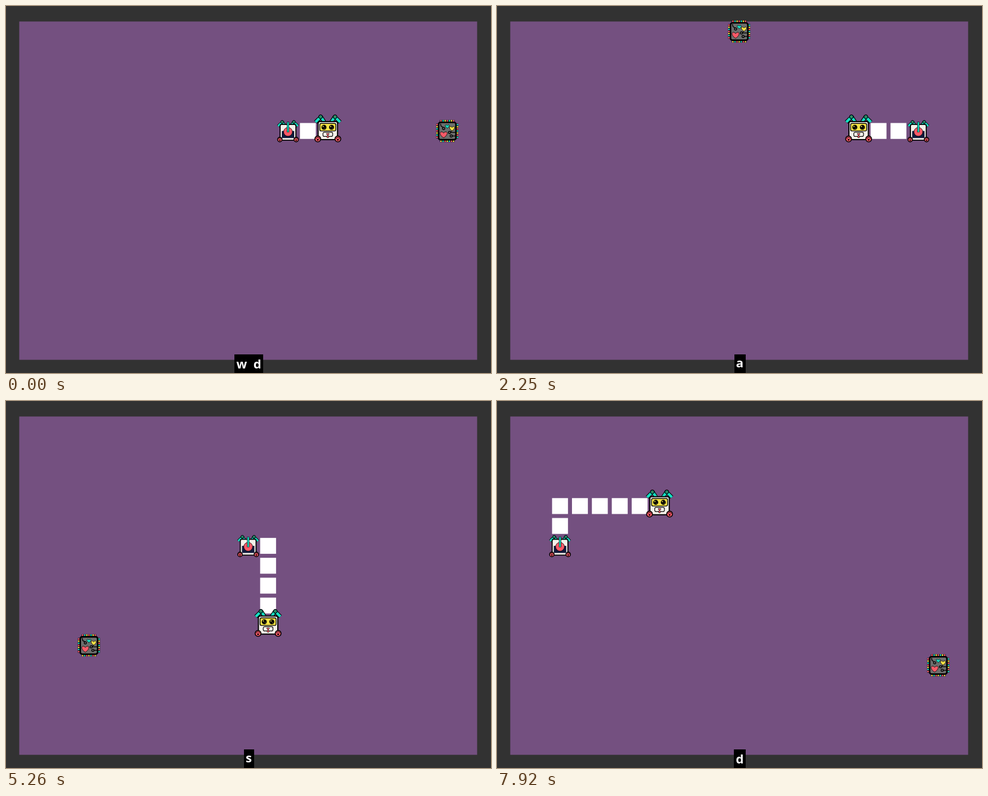
Animation, 860 px wide and 651 px high, one loop 8 s. Source, as an HTML page with a canvas:

```html
<!DOCTYPE html>
<html lang="en">
<head>
<meta charset="utf-8">
<title>Robot dog snake</title>
<style>
  html, body { margin: 0; width: 100%; height: 100%; overflow: hidden; background: #323232; }
  canvas { display: block; }
</style>
</head>
<body>
<canvas id="stage" width="860" height="651"></canvas>
<script>
const ctx = document.getElementById('stage').getContext('2d');
const LOOP = 8000, CELL = 35.3, LEFT = 23.5, TOP = 27.5;
const TEAL = '#14e0c4', RED = '#fb5a68', YELLOW = '#f3e145', WHITE = '#f4f1ea', NAVY = '#101a3c', BLACK = '#000';

// Route on the grid; the first two steps only lay out the starting body.
const ROUTE = 'R7 U4 R2 D4 L5 U5 L8 D6 R3 D5 L10 U7 R5';
const DIRS = { R: [1, 0], L: [-1, 0], U: [0, -1], D: [0, 1] };
const LEAD = 2;
const path = [[13, 5]];
for (const leg of ROUTE.split(' ')) {
  const [dx, dy] = DIRS[leg[0]];
  for (let i = +leg.slice(1); i > 0; i--) {
    const [x, y] = path[path.length - 1];
    path.push([x + dx, y + dy]);
  }
}

// [ms, move]; moves in between are evenly spaced.
const BEATS = [[-50, 0], [760, 7], [890, 8], [1090, 10], [1680, 15], [1780, 16], [2250, 20],
  [2510, 22], [2610, 23], [3210, 28], [3410, 30], [3540, 31], [4330, 38], [4460, 39], [5260, 46],
  [5390, 47], [6170, 54], [6270, 55], [6990, 61], [7090, 62], [7790, 68], [7920, 69]];

// [move at which the chip appears, column, row]
const CHIPS = [[0, 21, 5], [16, 11, 0], [31, 9, 6], [39, 3, 11], [56, 6, 4], [68, 21, 12]];

// [ms, keys held]
const KEYS = [[0, 'wd'], [30, 'd'], [620, 'dw'], [720, 'w'], [1120, 'wd'], [1300, 'wds'], [1390, 'ds'],
  [1810, 'dsa'], [1900, 'sa'], [2010, 'a'], [2350, 'wa'], [2440, 'w'], [2940, 'wa'], [3050, 'a'],
  [3850, 'as'], [3950, 's'], [4550, 'sd'], [4650, 'd'], [4890, 'ds'], [4990, 's'], [5480, 'sa'],
  [5590, 'a'], [6600, 'aw'], [6700, 'w'], [7410, 'wd'], [7510, 'd']];

// Last entry whose first value has been reached.
const latest = (list, v) => list.filter(e => e[0] <= v).pop();

function moveAt(t) {
  const from = latest(BEATS, t), to = BEATS[BEATS.indexOf(from) + 1];
  const [t0, m0] = from;
  if (!to) return m0;
  const [t1, m1] = to;
  return Math.floor(m0 + (m1 - m0) * (t - t0) / (t1 - t0) + 1e-6);
}

function rect(x, y, w, h, fill) {
  ctx.fillStyle = fill;
  ctx.fillRect(x, y, w, h);
}

function paint(fill, line) {
  if (fill) { ctx.fillStyle = fill; ctx.fill(); }
  if (line) { ctx.strokeStyle = BLACK; ctx.lineWidth = line; ctx.stroke(); }
}

function box(x, y, w, h, r, fill, line) {
  ctx.beginPath();
  ctx.roundRect(x, y, w, h, r);
  paint(fill, line);
}

function disc(x, y, r, fill, line) {
  ctx.beginPath();
  ctx.arc(x, y, r, 0, 7);
  paint(fill, line);
}

function bar(pts, width, color) {
  ctx.beginPath();
  pts.forEach(([x, y]) => ctx.lineTo(x, y));
  ctx.lineWidth = width;
  ctx.strokeStyle = color;
  ctx.stroke();
}

function heart(x, y, s, fill) {
  ctx.beginPath();
  ctx.moveTo(x, y + s);
  ctx.bezierCurveTo(x - s * 2, y - s * 0.3, x - s * 0.9, y - s * 1.6, x, y - s * 0.5);
  ctx.bezierCurveTo(x + s * 0.9, y - s * 1.6, x + s * 2, y - s * 0.3, x, y + s);
  paint(fill, 0.8);
}

function at(x, y, draw) {
  ctx.save();
  ctx.translate(LEFT + (x + 0.5) * CELL, TOP + (y + 0.5) * CELL);
  draw();
  ctx.restore();
}

// Draws a part on the right and again mirrored on the left.
function mirrored(draw) {
  for (const s of [1, -1]) {
    ctx.save();
    ctx.scale(s, 1);
    draw();
    ctx.restore();
  }
}

function ear(x, y, k) {
  ctx.save();
  ctx.translate(x, y);
  ctx.scale(k, k);
  for (const [w, c] of [[7, BLACK], [4.6, TEAL]]) {
    bar([[-6.5, 9], [-0.5, 0]], w, c);
    bar([[2, 2.5], [9, 9.5]], w, c);
  }
  disc(0, 0, 3.2, TEAL, 1.5);
  disc(0, 0, 1.1, YELLOW, 0.8);
  ctx.restore();
}

function wheel(x, y, r) {
  disc(x, y, r, RED, 1.6);
  disc(x, y + r * 0.28, r * 0.3, BLACK);
  for (const a of [-2.7, -1.95, -1.2, -0.45]) {
    disc(x + Math.cos(a) * r * 0.58, y + Math.sin(a) * r * 0.58, r * 0.16, BLACK);
  }
}

function head() {
  mirrored(() => ear(12.8, -25.2, 1));
  box(-17.2, -16.6, 34.4, 32, 3, WHITE, 2);
  box(-14.2, -13.4, 28.4, 13.4, 2.5, YELLOW, 1.4);
  for (const x of [-6.8, 6.6]) {
    disc(x, -6.6, 4.4, BLACK);
    disc(x - 1.5, -8, 1.1, YELLOW);
    disc(x + 1.6, -4.8, 0.6, YELLOW);
  }
  box(-8.6, 2.2, 17.2, 7.6, 2.5, WHITE, 1.2);
  disc(0, 10.2, 1.9, RED, 0.8);
  heart(0, 6, 2, RED);
  mirrored(() => wheel(17.8, 14.2, 5.2));
}

function tail() {
  mirrored(() => ear(10.4, -16, 0.78));
  box(-14, -11.6, 28, 28, 2.5, WHITE, 1.8);
  rect(-11, 0, 22, 12.6, NAVY);
  disc(0, 1.6, 7.8, RED, 0.8);
  bar([[0, -16.2], [0, 2.4]], 4, BLACK);
  bar([[0, -15.6], [0, 2]], 2.6, TEAL);
  mirrored(() => wheel(14.5, 15.2, 4));
}

function chip() {
  const hues = [RED, TEAL, YELLOW];
  for (let side = 0; side < 4; side++) {
    ctx.save();
    ctx.rotate(side * Math.PI / 2);
    rect(-13, -19.6, 26, 5, BLACK);
    for (let i = 0; i < 7; i++) rect(-12.3 + i * 3.7, -19.4, 2.5, 4.6, hues[(i + side) % 3]);
    ctx.restore();
  }
  box(-15.4, -15.2, 30.8, 30.8, 3.5, '#6d6e6d', 2.8);
  bar([[-12, -13], [-11, -8.5], [-7, -6]], 1.4, BLACK);
  bar([[4, 2.6], [15, 2.6]], 1.4, BLACK);
  bar([[7, 8.9], [15, 8.9]], 1.4, BLACK);
  bar([[5.6, 2], [9, -1]], 1.2, BLACK);
  for (const [x, y] of [[-6.4, -4.4], [4, 2.6], [7, 8.9]]) disc(x, y, 2, '#6d6e6d', 1.4);
  heart(0, -8, 3.2, TEAL);
  heart(8.5, -4.2, 4, YELLOW);
  heart(-6.4, 6.6, 5.6, RED);
}

function label(keys) {
  const text = [...keys].join('\u00a0\u00a0');
  ctx.font = '700 22px "Noto Sans", "Open Sans", sans-serif';
  ctx.textAlign = 'center';
  const m = ctx.measureText(text);
  const w = Math.round(m.width + 7);
  rect(Math.round(430.5 - w / 2), 618, w, 33, BLACK);
  ctx.fillStyle = '#fff';
  const rise = m.actualBoundingBoxAscent - m.actualBoundingBoxDescent;
  ctx.fillText(text, 430.5, Math.round(634.5 + rise / 2));
}

function render(t) {
  const n = moveAt(t);
  const goal = latest(CHIPS, n);
  const [born, cx, cy] = goal;
  const size = 3 + CHIPS.indexOf(goal);
  const cell = i => path[n + LEAD - i];
  // A fresh segment shares the tail's cell for one move.
  const last = n === born && n > 0 ? size - 2 : size - 1;

  rect(0, 0, 860, 651, '#323232');
  rect(LEFT, TOP, CELL * 23, CELL * 17, '#745080');
  at(cx, cy, chip);
  for (let i = 1; i < size - 1; i++) at(...cell(i), () => rect(-14.1, -14.1, 28.2, 28.2, '#fff'));
  at(...cell(last), tail);
  at(...cell(0), head);
  label(latest(KEYS, t)[1]);
}

const start = performance.now();
function tick() {
  render(Math.max(0, performance.now() - start) % LOOP);
  requestAnimationFrame(tick);
}
tick();
</script>
</body>
</html>
```
